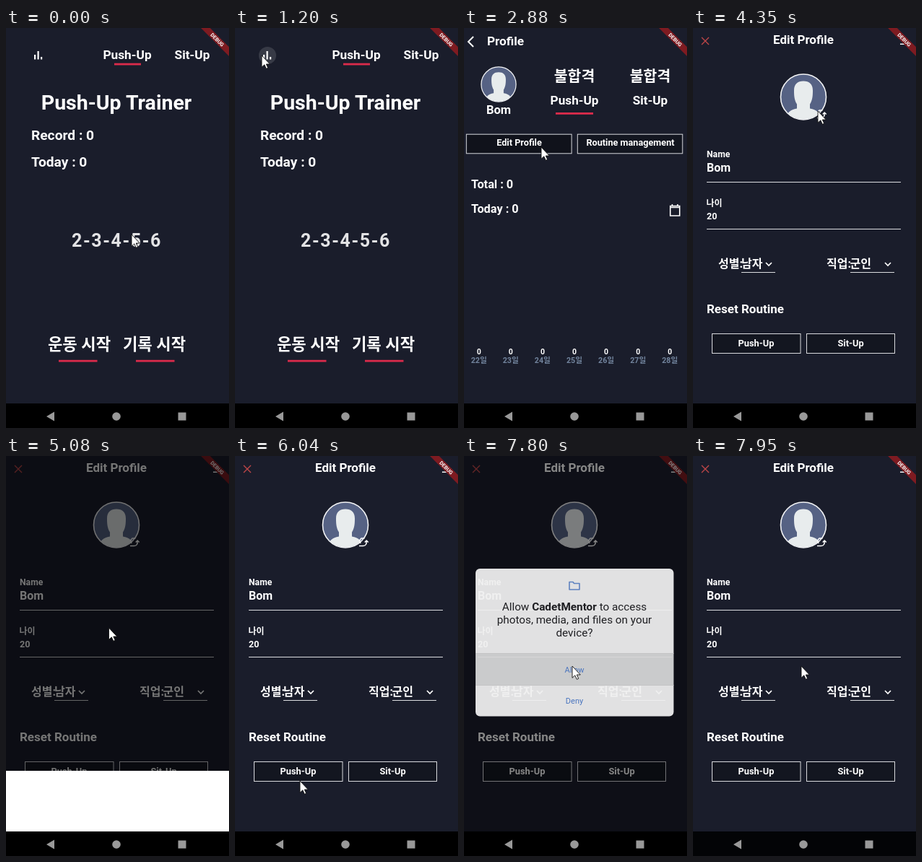
Write an HTML page that moves like this. It is 309 by 554 pixels and loops after 8 s.

```html
<!DOCTYPE html>
<html lang="ko">
<head>
<meta charset="utf-8">
<title>Workout trainer</title>
<style>
  html, body { margin: 0; width: 100%; height: 100%; overflow: hidden; background: #1a1d2b; }
  svg { display: block; width: 309px; height: 554px; }
  text { font-family: Roboto, "Noto Sans CJK KR", "Noto Sans CJK", sans-serif; font-weight: 700; fill: #fff; }
  .mid { text-anchor: middle; }
  .red { fill: #db2b4b; }
  .line { fill: none; stroke: #fff; }
  .rule { stroke: #dcdde0; fill: none; }
  .button { fill: #131620; stroke: #d8d9dd; }
  #dialog text { fill: #212124; font-weight: 400; font-size: 15.3px; }
  #dialog tspan { font-weight: 700; }
  #dialog .action { fill: #5283d6; font-size: 11px; }
</style>
</head>
<body>
<svg viewBox="0 0 309 554">
  <defs>
    <clipPath id="disc"><circle r="31"/></clipPath>
    <g id="avatar">
      <circle r="31.5" fill="#566284"/>
      <path clip-path="url(#disc)" fill="#e8eced" d="M-24 33C-23 21-19 18-9 16V10C-13 4-13-4-13-9C-13-18-8-22 0-22S13-18 13-9C13-4 13 4 9 10V16C19 18 23 21 24 33Z"/>
      <circle r="31.5" fill="none" stroke="#f2f3f5" stroke-width="1.6"/>
    </g>
    <path id="chevron" class="line" stroke-width="1.7" d="M-4-2 0 2 4-2"/>
    <clipPath id="screen"><rect width="309" height="520"/></clipPath>
  </defs>

  <g clip-path="url(#screen)">
    <rect width="309" height="520" fill="#1a1d2b"/>

    <g id="home">
      <path d="M39 37h2.200v6.500H39zM43.500 32h2.200v11.500h-2.200zM48 40h2.200v3.500H48z" fill="#fff"/>
      <circle id="ripple" cx="45" cy="38" fill="#fff" fill-opacity=".13"/>
      <g font-size="17.300">
        <text class="mid" x="168" y="43">Push-Up</text>
        <text class="mid" x="258" y="43">Sit-Up</text>
      </g>
      <rect class="red" x="150" y="48.700" width="37" height="2.800"/>
      <text class="mid" x="153" y="113" font-size="28.500">Push-Up Trainer</text>
      <g font-size="19.200">
        <text x="35" y="154.500">Record : 0</text>
        <text x="35" y="191.500">Today : 0</text>
      </g>
      <text class="mid" x="153.500" y="303" font-size="25" letter-spacing="1.600" fill-opacity=".88">2-3-4-5-6</text>
      <g class="mid" font-size="22.200">
        <text x="101.500" y="446">운동 시작</text>
        <text x="205.500" y="446">기록 시작</text>
      </g>
      <path class="red" d="M73 459.800h53.500v2.800H73zM180 459.800h53.500v2.800H180z"/>
    </g>

    <g id="profile">
      <rect width="309" height="520" fill="#1a1d2b"/>
      <path class="line" stroke-width="2" d="M13 12 6 19l7 7"/>
      <text x="32" y="24" font-size="17.200">Profile</text>
      <use href="#avatar" transform="translate(48 78) scale(.765)"/>
      <text class="mid" x="48" y="119" font-size="16.500">Bom</text>
      <g class="mid" font-size="20.500">
        <text x="153" y="74">불합격</text>
        <text x="258" y="74">불합격</text>
      </g>
      <g class="mid" font-size="17.200">
        <text x="153" y="106">Push-Up</text>
        <text x="258" y="106">Sit-Up</text>
      </g>
      <rect class="red" x="127" y="117" width="52" height="2.800"/>
      <rect id="editButton" class="button" x="3.300" y="147.200" width="145.800" height="26.600"/>
      <rect class="button" x="157.300" y="147.200" width="145.500" height="26.600"/>
      <g class="mid" font-size="12.700">
        <text x="76.500" y="163">Edit Profile</text>
        <text x="230.500" y="163">Routine management</text>
      </g>
      <g font-size="16.300">
        <text x="10" y="222">Total : 0</text>
        <text x="10" y="256">Today : 0</text>
      </g>
      <path class="line" stroke-width="1.600" d="M285.800 246.500h13v13.500h-13zM285.800 248.500h13M288.500 244v3M296 244v3"/>
      <g id="days" class="mid"></g>
    </g>

    <g id="edit">
      <rect width="309" height="520" fill="#1a1d2b"/>
      <path d="M12 13l10 10M22 13 12 23" stroke="#bd4648" stroke-width="1.400"/>
      <text class="mid" x="153" y="22" font-size="17">Edit Profile</text>
      <path class="line" stroke-width="1.500" d="M287 22.300h7"/>
      <use href="#avatar" x="153" y="95.500"/>
      <path class="line" stroke-width="1.500" d="M179.500 114h-4.500l-2.500 3 1.500 4M172 124.500h5.500c4 0 5-3 4.700-7M179.700 119.500l2.500-2.500 2.500 2.500"/>
      <text x="19" y="179" font-size="12.200">Name</text>
      <text x="19" y="199" font-size="16">Bom</text>
      <text x="18.500" y="247" font-size="12">나이</text>
      <text x="19" y="265" font-size="12.500">20</text>
      <path class="rule" d="M19 213.500h269M19 278.500h269M67 338.500h47M218 338.500h61"/>
      <g font-size="16">
        <text x="35" y="332">성별:</text>
        <text x="67" y="332">남자</text>
        <text x="185" y="332">직업:</text>
        <text x="217.500" y="332">군인</text>
      </g>
      <use href="#chevron" x="105" y="327"/>
      <use href="#chevron" x="270" y="327"/>
      <text x="19" y="395" font-size="17">Reset Routine</text>
      <rect class="button" x="26.500" y="423.500" width="122.500" height="27"/>
      <rect class="button" x="157.500" y="423.500" width="122" height="27"/>
      <g class="mid" font-size="12.800">
        <text x="87.500" y="441">Push-Up</text>
        <text x="218.500" y="441">Sit-Up</text>
      </g>
    </g>

    <g transform="translate(309) rotate(45)">
      <rect x="-40" y="18.500" width="80" height="9" fill="#7e1b21"/>
      <text class="mid" y="25.600" font-size="7.200">DEBUG</text>
    </g>

    <rect id="dim" width="309" height="520"/>
    <rect id="sheet" y="436" width="309" height="84" fill="#fff"/>

    <g id="dialog" class="mid">
      <rect x="16" y="156" width="274.500" height="204.500" rx="6" fill="#fff"/>
      <path d="M146 174.500h5l1.500 2h7.500v8.500h-14z" fill="none" stroke="#6a92d8" stroke-width="1.600" stroke-linejoin="round"/>
      <text x="153" y="214">Allow <tspan>CadetMentor</tspan> to access</text>
      <text x="153" y="232">photos, media, and files on your</text>
      <text x="153" y="250">device?</text>
      <rect id="press" x="16" y="274" width="274.500" height="43"/>
      <path d="M16 273.500h274.500M16 317.500h274.500" stroke="#dedede"/>
      <text class="action" x="153" y="300">Allow</text>
      <text class="action" x="153" y="343">Deny</text>
    </g>
  </g>

  <rect y="520" width="309" height="34"/>
  <rect id="navFade" y="520" width="309" height="34" fill="#1a1d2b"/>
  <path d="M56 538l11-6.500v13zM238.500 532.500h11v11h-11z" fill="#999"/>
  <circle cx="153" cy="538" r="5.800" fill="#999"/>

  <g id="cursor">
    <circle id="click" r="12" fill="#fff09a" fill-opacity=".35"/>
    <path d="M0 0V16.300L3.800 12.800 6.300 18.300 8.700 17.300 6.300 12H11.300Z" fill="#fff" stroke="#111" stroke-width=".9"/>
  </g>
</svg>

<script>
const LOOP = 8000;
const el = id => document.getElementById(id);
const within = (t, a, b) => t >= a && t < b;
const ramp = (t, a, b) => Math.min(1, Math.max(0, (t - a) / (b - a)));
const ease = p => p * p * (3 - 2 * p);
const set = (id, attrs) => {
  for (const name in attrs) el(id).setAttribute(name, attrs[name]);
};

// Each move: start, end, then the tip position reached.
const start = [174, 286];
const moves = [
  [330, 1040, 37, 38],
  [1850, 2600, 107, 165],
  [3300, 3950, 173, 115],
  [4810, 5470, 90, 450],
  [6300, 6850, 167, 270],
  [7130, 7300, 150, 291],
];
const clicks = [[1080, 1200], [2560, 2640], [4100, 4190], [5630, 5720], [6880, 7030], [7310, 7400]];

el("days").innerHTML = Array.from({ length: 7 }, (_, i) => {
  const x = 20.7 + 44.1 * i;
  return `<text x="${x}" y="452" font-size="10.5">0</text>
    <text x="${x}" y="464" font-size="10.7" style="fill:#71839c">${22 + i}일</text>`;
}).join("");

function cursorAt(t) {
  let [x, y] = start;
  for (const [a, b, toX, toY] of moves) {
    const p = ease(ramp(t, a, b));
    x += (toX - x) * p;
    y += (toY - y) * p;
  }
  return [x, y];
}

function showPage(id, p) {
  const rise = 60 * (1 - p) ** 2;
  set(id, { opacity: p, transform: `translate(0 ${rise})` });
}

function draw(now) {
  const t = now % LOOP;
  showPage("profile", ramp(t, 1370, 1650));
  showPage("edit", ramp(t, 2960, 3190));

  set("ripple", { r: 26 * ramp(t, 1150, 1260), opacity: +within(t, 1150, 1660) });
  set("editButton", { style: within(t, 2860, 3200) ? "fill:#10121b" : "" });

  const sheet = ease(ramp(t, 4380, 4560)) - ease(ramp(t, 5850, 6040));
  const dialog = ramp(t, 6170, 6350) - ramp(t, 7780, 7950);
  set("sheet", { transform: `translate(0 ${84 * (1 - sheet)})` });
  set("dialog", { opacity: dialog });
  set("dim", { opacity: 0.54 * Math.max(sheet, dialog) });
  set("press", { opacity: 0.1 * ramp(t, 7440, 7640) });
  set("navFade", { opacity: 0.15 * ramp(t, 7900, 7950) });

  set("cursor", { transform: `translate(${cursorAt(t)})` });
  set("click", { opacity: +clicks.some(([a, b]) => within(t, a, b)) });
}

function loop() {
  draw(performance.now());
  requestAnimationFrame(loop);
}
loop();
</script>
</body>
</html>
```
